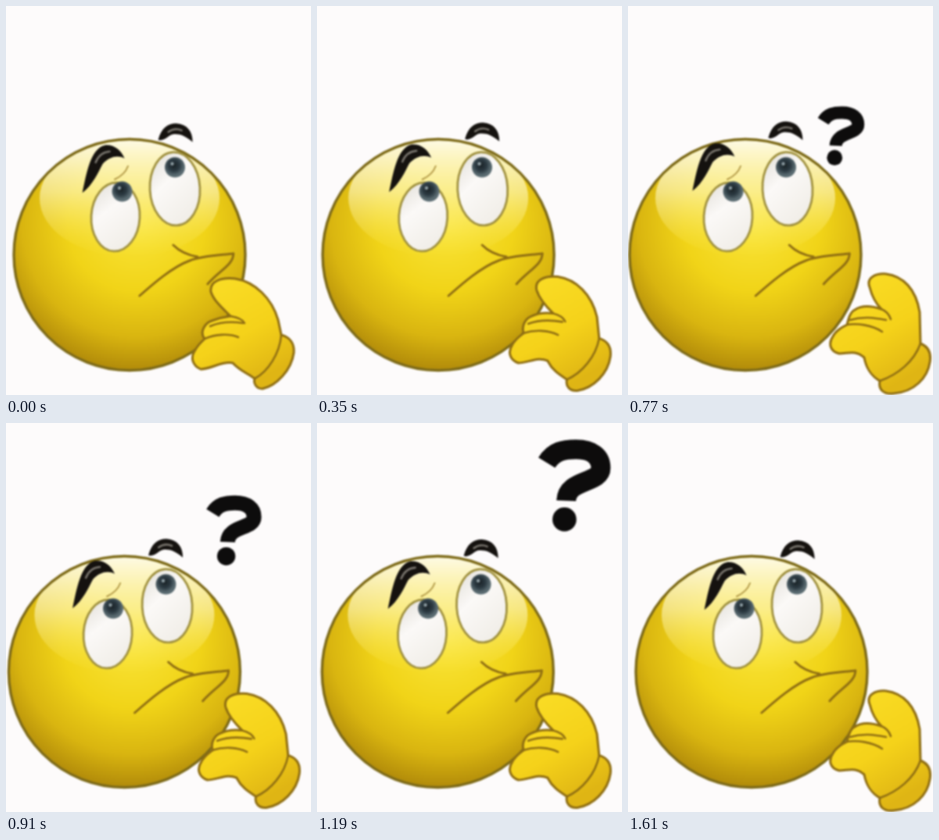
Animation of 390 by 498 pixels, one loop 1.68 s. Source, as an HTML page:

```html
<!DOCTYPE html>
<html lang="en">
<head>
<meta charset="utf-8">
<title>Thinking face</title>
<style>
  html, body { margin: 0; width: 100%; height: 100%; overflow: hidden; background: #fdfbfb; }
  svg { display: block; filter: blur(.9px); }
  .line { fill: none; stroke: #8f6e12; stroke-width: 3; stroke-linecap: round; stroke-linejoin: round; }
  .eye { fill: url(#white); stroke: #a0913f; stroke-width: 2.8; }
  .ink { fill: #15120f; }
  .glint { fill: none; stroke: #77736c; stroke-width: 2.6; stroke-linecap: round; }
</style>
</head>
<body>
<svg width="390" height="498" viewBox="0 0 390 498">
  <defs>
    <radialGradient id="skin" cx=".53" cy=".36" r=".66">
      <stop offset="0" stop-color="#fae53a"/>
      <stop offset=".45" stop-color="#f1d418"/>
      <stop offset=".75" stop-color="#d9b510"/>
      <stop offset="1" stop-color="#ac8509"/>
    </radialGradient>
    <linearGradient id="shine" x2="0" y2="1">
      <stop offset="0" stop-color="#fffdf0" stop-opacity=".95"/>
      <stop offset=".45" stop-color="#fff9c8" stop-opacity=".6"/>
      <stop offset="1" stop-color="#ffee60" stop-opacity="0"/>
    </linearGradient>
    <linearGradient id="white" x2=".6" y2="1">
      <stop offset="0" stop-color="#e0ddd6"/>
      <stop offset=".45" stop-color="#fbf9f7"/>
      <stop offset="1" stop-color="#f1eee8"/>
    </linearGradient>
    <linearGradient id="glove" x2=".5" y2="1">
      <stop offset="0" stop-color="#fbdf28"/>
      <stop offset=".6" stop-color="#f5d21a"/>
      <stop offset="1" stop-color="#dfb514"/>
    </linearGradient>
    <radialGradient id="iris" cx=".45" cy=".4">
      <stop offset="0" stop-color="#1a2226"/>
      <stop offset=".55" stop-color="#2c3a42"/>
      <stop offset="1" stop-color="#5b6c72"/>
    </radialGradient>
  </defs>

  <g id="question">
    <path d="M9 27C17 14 28 12 42 12C60 12 70 20 70 33C70 51 32 45 31 70" fill="none" stroke="#0d0c0c" stroke-width="22"/>
    <circle cx="29" cy="91" r="13.5" fill="#0d0c0c"/>
  </g>

  <g id="head">
    <circle cx="154" cy="318.5" r="148" fill="url(#skin)"/>
    <ellipse cx="154" cy="246" rx="115" ry="75" fill="url(#shine)"/>
    <circle cx="154" cy="318.5" r="148" fill="none" stroke="#7d6a18" stroke-width="3.4"/>
  </g>

  <g id="mouth" class="line">
    <path d="M167 371C184 356 209 334 231 326C249 319 271 319 287 317"/>
    <path d="M210 306C217 313 229 319 241 321"/>
    <path d="M287 317C287 331 270 338 254 356"/>
  </g>

  <g id="eyes">
    <path class="line" d="M133 222Q146 216 150 205" style="stroke:#b39a48;stroke-width:2"/>
    <ellipse class="eye" cx="134" cy="270" rx="31" ry="44" transform="rotate(3 134 270)"/>
    <ellipse class="eye" cx="210" cy="234" rx="32" ry="47" transform="rotate(-3 210 234)"/>
  </g>

  <g id="pupils">
    <g id="pupil">
      <circle cx="141.5" cy="237.5" r="13" fill="url(#iris)"/>
      <circle cx="138" cy="233" r="2.2" fill="#8d9ca2"/>
    </g>
    <use href="#pupil" x="67.5" y="-31"/>
  </g>

  <g id="brows">
    <path class="ink" d="M90 238C95 215 100 181 119 177C131 176 140 184 144 194C135 189 124 192 116 201C110 212 104 227 90 238Z"/>
    <path class="glint" d="M107 199Q112 186 125 185"/>
    <path class="ink" d="M187 170C191 155 199 149 210 149C224 150 231 159 231 173C222 165 214 162 206 163C200 164 194 173 187 170Z"/>
    <path class="glint" d="M200 160Q208 154 217 158"/>
  </g>

  <path id="hand" class="line" style="fill:url(#glove)"/>
  <path id="creases" class="line" style="stroke-width:2.6"/>
</svg>
<script>
const LOOP = 1680, STEP = 70;
const el = id => document.getElementById(id);
const move = (id, x, y = 0) => el(id).setAttribute('transform', `translate(${x} ${y})`);

// Head turn: 1 is fully right, -1 fully left
const sway = [[0, 1], [350, .29], [560, -.29], [770, -1], [1050, -.29], [1400, .65], [1610, 1], [LOOP, 1]];

// Each pair runs from touching the chin to pulled away
const hand = [
  'M262 366C260 352 276 347 293 349C318 353 340 374 348 402L352 421C363 424 369 432 368 444C365 466 346 486 328 490C320 490 316 483 318 477C308 470 298 466 290 457C277 454 262 465 249 465C238 460 236 450 241 442C245 434 250 430 254 426C247 418 254 406 263 403C271 400 279 398 287 397C278 388 266 378 262 366Z',
  'M309 360C304 347 318 342 330 343C352 346 368 362 373 392L374 432C384 436 388 444 386 456C383 476 366 494 340 496C326 498 320 490 322 480C312 474 305 466 302 450C290 440 282 445 270 445C258 442 256 432 262 423C266 415 274 411 280 408C282 400 284 392 290 389C300 382 312 384 324 388C318 382 312 372 309 360Z'
];
const creases = [
  'M352 421C350 445 335 468 318 477M287 397C293 398 302 400 305 406M254 426C268 420 285 419 297 424M261 410C275 404 290 404 303 406',
  'M374 432C366 455 345 472 322 480M324 388C329 390 334 395 336 401M280 408C292 406 312 408 325 417M284 402C300 397 315 399 330 402'
];
const reach = [0, .4, .75, 1];

function valueAt(keys, t) {
  const i = keys.findIndex(k => k[0] > t);
  const [t0, a] = keys[i - 1], [t1, b] = keys[i];
  return a + (b - a) * (t - t0) / (t1 - t0);
}

function blend([from, to], u) {
  const ends = to.match(/\d+/g);
  let i = 0;
  return from.replace(/\d+/g, n => (+n + (ends[i++] - n) * u).toFixed(1));
}

function draw(now) {
  const step = Math.floor(now % LOOP / STEP), t = step * STEP;
  const k = valueAt(sway, t);
  move('head', 4 * k);
  move('mouth', 3.8 * k);
  move('eyes', 6 * k);
  move('pupils', 7 * k);
  move('brows', 7.6 * k, 1.2 * k);

  const u = reach[step % 4];
  el('hand').setAttribute('d', blend(hand, u));
  el('creases').setAttribute('d', blend(creases, u));

  const d = t - 1050;
  el('question').setAttribute('transform',
    `translate(${270 + d * .0964} ${56 - d * .256}) scale(${1 + d * .00096})`);
  el('question').setAttribute('visibility', t >= 490 && t <= 1260 ? 'visible' : 'hidden');
}

const start = performance.now();
function tick() {
  draw(performance.now() - start);
  requestAnimationFrame(tick);
}
tick();
</script>
</body>
</html>
```
